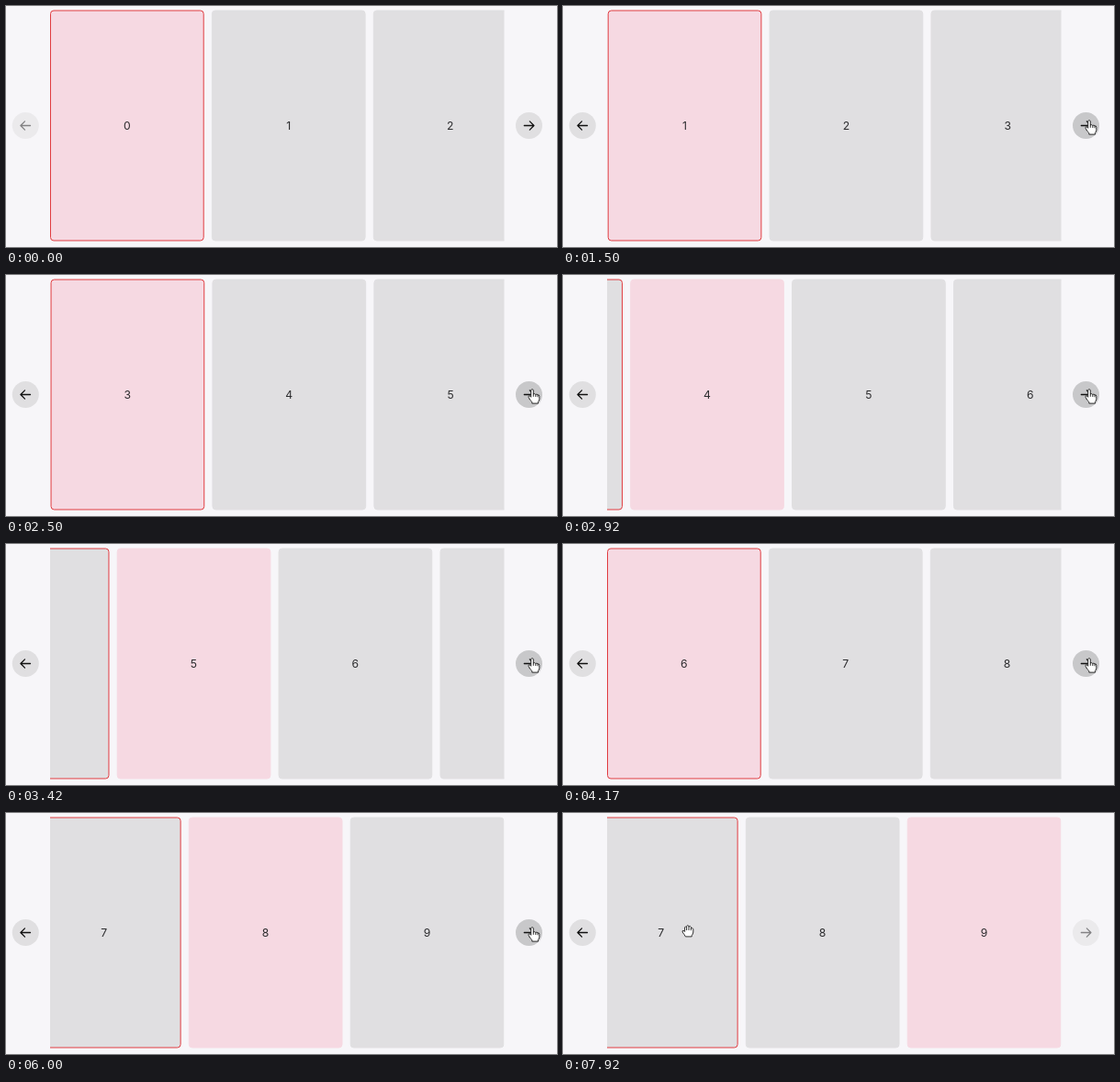
Write an HTML page that moves like this. It is 600 by 263 pixels and loops after 8000 ms.

```html
<!DOCTYPE html>
<html lang="en">
<head>
<meta charset="utf-8">
<title>Carousel</title>
<style>
  html, body { margin: 0; width: 100%; height: 100%; overflow: hidden; background: #f7f6f9; }
  svg { display: block; width: 100%; height: 100%; }
  text { font: 12.2px Inter, Arial, sans-serif; fill: #2b2b2d; text-anchor: middle; }
  .arrow { fill: none; stroke: #111; stroke-width: 1.3; stroke-linecap: round; stroke-linejoin: round; }
  .hand { fill: #fff; stroke: #1a1a1a; stroke-width: .9; stroke-linejoin: round; }
</style>
</head>
<body>
<svg viewBox="0 0 600 263">
  <clipPath id="view"><rect x="48" width="494.5" height="263"/></clipPath>
  <g clip-path="url(#view)"><g id="track"></g></g>
  <g id="prev" transform="translate(21.3 130.5)">
    <circle r="14.5"/><path class="arrow" d="M5.2 0H-5.4M-.8-4.6L-5.4 0L-.8 4.6"/>
  </g>
  <g id="next" transform="translate(569.5 130.5)">
    <circle r="14.5"/><path class="arrow" d="M-5.2 0H5.4M.8-4.6L5.4 0L.8 4.6"/>
  </g>
  <g id="cursor">
    <path id="pointer" d="M0 0V11.5L2.7 9L4.4 13L6.2 12.2L4.5 8.3H8.2Z" fill="#111" stroke="#fff" stroke-width=".8"/>
    <path id="press" class="hand" d="M-1.3 1.2Q0-.6 1.3 1.2V6Q2.6 4.6 3.8 6.2Q5.2 5 6 6.6Q7.6 6 7.8 8V11Q7.6 13 6.4 14.2V15.8H-.2V14.4Q-2 12.6-3.8 9.4Q-4.6 7.6-3 7.4Q-2 7.6-1.3 9ZM1.3 6V8.5M3.8 6.2V8.7M6 6.6V9"/>
    <path id="grab" class="hand" transform="translate(0 4.2)" d="M-3.4 1V-3.6Q-2.6-5.4-1.4-3.8V-5Q-.2-6.8 1-5V-4.4Q2.4-5.8 3.4-4V-2.6Q5-3.6 5.8-2V1.5Q5.6 3.6 4.2 5.2V6.4H-2.6Q-3.6 4.4-5.8 1.6Q-6.4-.2-5-.2Q-4 .2-3.4 1ZM-1.4-3.8V-.5M1-4.6V-.5M3.4-3V-.3"/>
  </g>
</svg>
<script>
const LOOP = 8000, PITCH = 175.9, LEFT = 48, END = 7.1426, FADE = 200;
const GRAY = [224, 223, 225], PINK = [246, 217, 226], HOVER = [200, 200, 202];
// Each click selects the next card: start, scroll duration, scroll position in cards.
const clicks = [
  [1100, 415, 1], [1610, 440, 2], [2060, 455, 3], [2600, 420, 4], [3180, 430, 5],
  [3650, 510, 6], [4590, 245, 7], [5270, 310, END], [6270, 310, END]
];
const FIRST = clicks[0][0], LAST = clicks[8][0];

const $ = id => document.getElementById(id);
const phase = (t, start, length) => Math.min(1, Math.max(0, (t - start) / length));
const smooth = p => p * p * (3 - 2 * p);
const easeOut = p => 1 - (1 - p) ** 2;
const mix = (a, b, p) => a + (b - a) * p;
const blend = (a, b, p) => `rgb(${a.map((v, i) => Math.round(mix(v, b[i], p)))})`;
const show = (id, on) => $(id).setAttribute('visibility', on ? 'visible' : 'hidden');

function add(tag, attributes) {
  const node = document.createElementNS('http://www.w3.org/2000/svg', tag);
  for (const key in attributes) node.setAttribute(key, attributes[key]);
  return $('track').appendChild(node);
}

const cards = Array.from({ length: 10 }, (_, i) => {
  const x = i * PITCH;
  const rect = add('rect', { x: x + .5, y: 5, width: 166.7, height: 251, rx: 3.5 });
  add('text', { x: x + 83.8, y: 135 }).textContent = i;
  return rect;
});

function scrollAt(t) {
  let position = 0;
  for (const [start, length, target] of clicks)
    position = mix(position, target, smooth(phase(t, start, length)));
  return position;
}

function drawCards(t) {
  const position = scrollAt(t), current = Math.floor(position + .02);
  $('track').setAttribute('transform', `translate(${LEFT - position * PITCH} 0)`);
  cards.forEach((card, i) => {
    const selected = i ? phase(t, clicks[i - 1][0], FADE) : 1;
    const left = i < 9 ? phase(t, clicks[i][0], FADE) : 0;
    const fill = blend(GRAY, PINK, selected - left);
    card.setAttribute('fill', fill);
    card.setAttribute('stroke', i === current ? '#e03c40' : fill);
  });
}

function drawButton(id, enabled, hovered) {
  $(id).setAttribute('opacity', mix(.5, 1, enabled));
  $(id).firstElementChild.setAttribute('fill', blend(GRAY, HOVER, hovered));
}

function drawCursor(t) {
  const enter = easeOut(phase(t, 540, 440)), leave = easeOut(phase(t, 7500, 420));
  const x = mix(mix(600, 573, enter), 136, leave);
  const y = mix(190, 124.3, enter) - 5 * Math.sin(Math.PI * leave);
  const overNext = Math.hypot(x - 569.5, y - 130.5) < 14.5;
  const pressing = overNext && t < LAST, grabbing = x < 542;
  const visible = t >= 570;
  $('cursor').setAttribute('transform', `translate(${x} ${y})`);
  show('press', visible && pressing);
  show('grab', visible && grabbing);
  show('pointer', visible && !pressing && !grabbing);
  return pressing;
}

function draw(now) {
  const t = now % LOOP;
  drawCards(t);
  const hovered = drawCursor(t);
  drawButton('prev', phase(t, FIRST, 300), 0);
  drawButton('next', 1 - phase(t, LAST, 300), hovered ? 1 : t < LAST ? 0 : 1 - phase(t, LAST, 300));
}

let begin;
function tick(now) {
  begin ??= now;
  draw(now - begin);
  requestAnimationFrame(tick);
}
draw(0);
requestAnimationFrame(tick);
</script>
</body>
</html>
```
